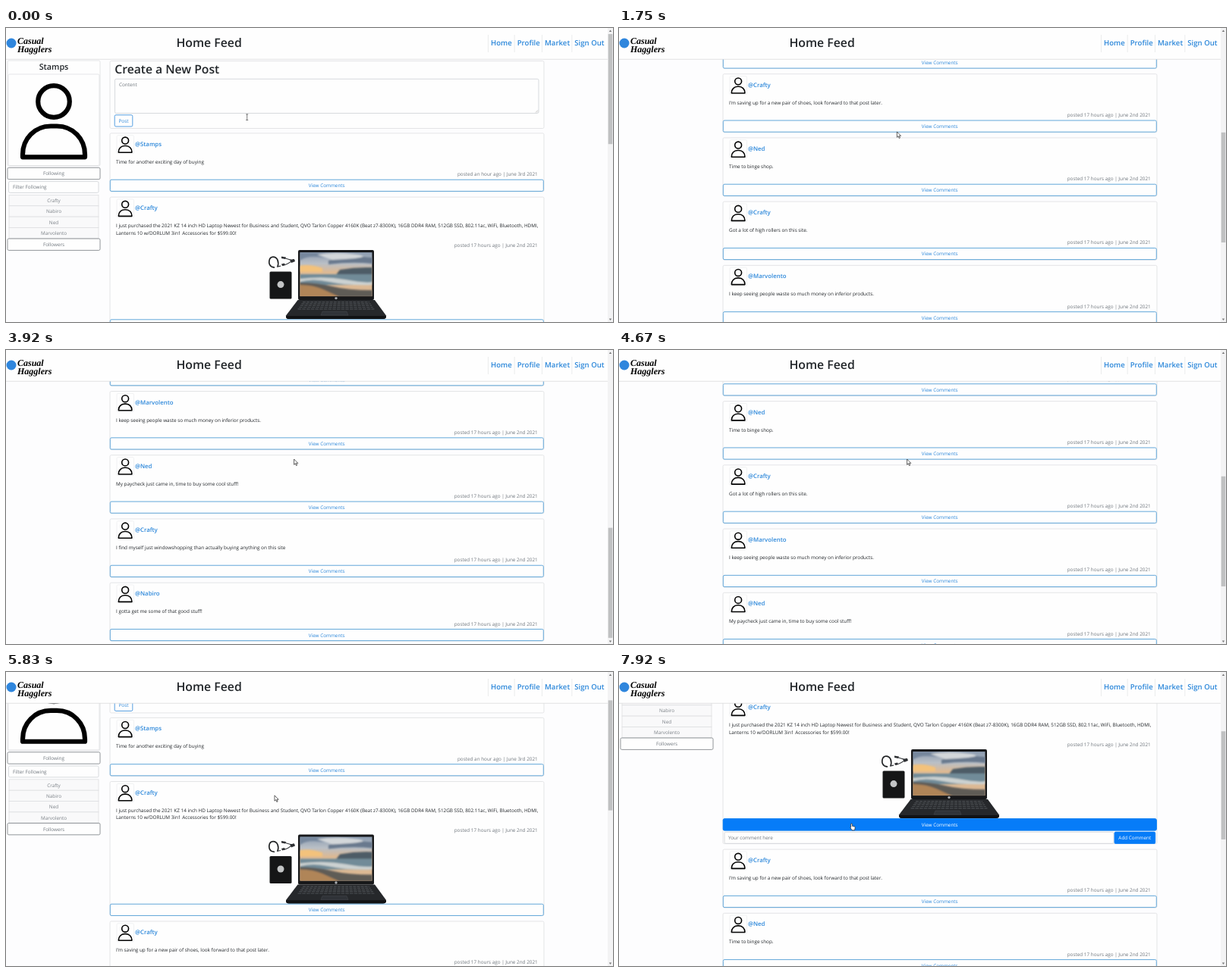
An HTML page that plays this animation: 800x388 px, repeating every 8000 ms.

```html
<!DOCTYPE html>
<html lang="en">
<head>
<meta charset="utf-8">
<title>Home Feed</title>
<style>
  html, body { margin: 0; width: 100%; height: 100%; overflow: hidden; background: #fdfdfe; }
  svg { display: block; width: 100vw; height: 100vh; }
  text { font-family: "Open Sans", "Noto Sans", sans-serif; font-size: 6.36px; text-rendering: geometricPrecision; }
  .semi { font-weight: 600; }
  .mid { text-anchor: middle; }
  .end { text-anchor: end; }
  .logo { font: italic bold 12px "Liberation Serif", "Noto Serif", serif; }
</style>
</head>
<body>
<svg id="stage" viewBox="0 0 800 388" xmlns="http://www.w3.org/2000/svg"></svg>
<script>
const LOOP = 8000, VIEW = 388, PAGE = 994, ROW = 17.5;
const BLUE = '#2b87da', SOLID = '#067cf8', INK = '#212529', GREY = '#6f767d', LINE = '#dedfe1';

const rect = (x, y, w, h, fill = 'none', stroke = 'none', extra = '') =>
  `<rect x="${x}" y="${y}" width="${w}" height="${h}" fill="${fill}" stroke="${stroke}" ${extra}/>`;
const box = (x, y, w, h, stroke = LINE, fill = '#fefefe', width = .8) =>
  rect(x, y, w, h, fill, stroke, `stroke-width="${width}" rx="1.7"`);
const text = (x, y, str, fill = INK, cls = '', size = 6.36) =>
  `<text x="${x}" y="${y}" fill="${fill}" class="${cls}" style="font-size:${size}px">${str}</text>`;
const path = (d, fill, stroke = 'none', width = 1) =>
  `<path d="${d}" fill="${fill}" stroke="${stroke}" stroke-width="${width}"/>`;
const group = (id, body, transform = '') => `<g id="${id}" transform="${transform}">${body}</g>`;

// Outlined person, drawn at the size of the sidebar portrait
const person = (width) => `<g fill="none" stroke="#000" stroke-width="${width}" stroke-linejoin="round">
  <circle cx="63" cy="97" r="20.8"/>
  <path d="M22 170.300V167C22 146 38 129.500 59 129.500H67C88 129.500 104 146 104 167V170.300Z"/></g>`;

function sidebar() {
  const names = ['Crafty', 'Nabiro', 'Ned', 'Marvolento'];
  return box(2, 43, 122, 139) + text(63, 55.2, 'Stamps', INK, 'semi mid', 10.8) +
    box(3, 61, 120, 120.5) + person(6.2) +
    box(2, 184.3, 122, 15.4, '#777c81') + text(63, 194.3, 'Following', GREY, 'mid') +
    box(3.5, 202.6, 118.5, 14.8, '#ced2d6') + text(9, 212.3, 'Filter Following', GREY) +
    names.map((name, i) => {
      const y = 220.4 + 14.35 * i;
      return rect(4, y, 118, 14.35, '#f9f9fa', LINE, 'stroke-width=".8"') +
        text(63, y + 9.7, name, '#7b8187', 'mid');
    }).join('') +
    box(2, 278, 122, 15.4, '#777c81') + text(63, 288.1, 'Followers', GREY, 'mid');
}

function composer() {
  return box(137, 43.5, 572, 89) + text(143.3, 60.2, 'Create a New Post', INK, 'semi', 15.7) +
    box(143.5, 67.3, 558.5, 45.2, '#ced2d6') + text(149, 77.4, 'Content', GREY) +
    path('M698 111.500L701 108.500M700 111.500L701 110.500', 'none', '#888', .5) +
    box(143.2, 114.8, 23.6, 15.2, BLUE) + text(155, 124.8, 'Post', BLUE, 'mid');
}

function author(name) {
  return box(146, 2.8, 22.5, 24.2, '#eeeff0') +
    `<g transform="translate(143.700 -11)scale(.213)">${person(7.5)}</g>` +
    text(170, 17, '@' + name, BLUE, 'semi', 7.8);
}

const viewButton = (y) =>
  box(137.3, y, 571, 15.2, '#62a7d9', '#fefefe', 1) +
  text(422.7, y + 10.1, 'View Comments', BLUE, 'mid');

function post([name, body, when = '17 hours ago | June 2nd']) {
  return box(137, 0, 572, 77) + author(name) + text(145, 40, body) +
    text(700.7, 56.4, `posted ${when} 2021`, GREY, 'end') + viewButton(61.3);
}

function keyboard() {
  let keys = '';
  for (let r = 0; r < 5; r++) {
    const y = 153.5 + r * 2.3, left = 391 - r * 1.6;
    keys += `<path d="M${left} ${y}H${870 - left}" stroke="#4a4d51" stroke-width="1.200" stroke-dasharray="${4 + r * .15} 1.100"/>`;
  }
  return keys;
}

// Beach at dusk: soft clouds, sea, surf and sand
function wallpaper() {
  return rect(387.5, 88, 95, 58, 'url(#dusk)') +
    `<g clip-path="url(#screen)"><g filter="url(#soft)">` +
    path('M387 88H440Q428 96 412 94T387 99Z', '#76879d') +
    path('M425 99Q445 91 483 95V103Q455 100 425 104Z', '#69798e') +
    path('M410 91Q435 87 462 91T430 98Z', '#d3d7da') +
    path('M387 106Q400 103 417 109V114H387Z', '#f3c27c') +
    path('M440 111Q462 107 483 108V119H434Z', '#4e5c66') +
    path('M387 117H483V131H387Z', '#718b98') +
    path('M387 123Q420 119 447 124T483 127V131Q448 132 426 127T387 127Z', '#ccd2d1') +
    path('M387 128Q410 128 430 133T483 138V147H387Z', '#5e5b57') +
    path('M387 131Q405 131 418 137T440 147H387Z', '#b08558') +
    '</g></g>';
}

// Product shot, in view coordinates with the lid top at y = 85
function laptop() {
  return path('M384.500 151H486L501 171.500V174Q500 176 497 176H373Q369 176 369 173V171.500Z', '#26282b') +
    path('M369 171.800H501V174Q500 176 497 176H373Q369 176 369 173Z', '#111214') +
    keyboard() + path('M417 166H449L451 171H415Z', '#303338', '#484b50', .5) +
    rect(385, 85, 100, 66, '#17181a', 'none', 'rx="2"') + wallpaper() +
    '<circle cx="435" cy="148.500" r="1.700" fill="#a9adb1"/>' +
    rect(347.5, 113.5, 29, 36, '#151617', 'none', 'rx="1.500"') +
    '<circle cx="362" cy="130.500" r="4.500" fill="#c3c5c6"/>' +
    path('M350 107C345 104 346 94 352 94S360 101 358 107M350 107L354 108', 'none', '#202224', 1.7) +
    path('M357 107L362 106M365 95Q371 97 379 99M365 105Q372 104 379 97', 'none', '#33363a', 1.1) +
    path('M363 93.500L369 94.500L368 97L363 96ZM374 98L380 97L381 100L376 102ZM363 103.500L367 102.500L368 105L364 106Z', '#2e3033');
}

function laptopPost() {
  return `<rect id="wideCard" x="137" y="0" width="572" height="177" rx="1.700" fill="#fefefe" stroke="${LINE}" stroke-width=".8"/>` +
    author('Crafty') +
    text(145, 40, 'I just purchased the 2021 KZ 14 inch HD Laptop Newest for Business and Student, QVO Tarlon Copper 4160K (Beat z7-8300K), 16GB DDR4 RAM, 512GB SSD, 802.11ac, WiFi, Bluetooth, HDMI,') +
    text(145, 49.9, 'Lanterns 10 w/DORLUM 3in1 Accessories for $599.00!') +
    text(700.7, 66.1, 'posted 17 hours ago | June 2nd 2021', GREY, 'end') +
    `<g transform="translate(0 -15)">${laptop()}</g>` + viewButton(161.7) +
    `<g id="hover">${box(137.3, 161.7, 571, 15.2, SOLID, SOLID, 1)}${text(422.7, 171.8, 'View Comments', '#fff', 'mid')}</g>` +
    `<g clip-path="url(#reveal)">` +
    box(139, 179.2, 513, 15, '#ced2d6') + text(144, 189, 'Your comment here', GREY) +
    box(653, 179, 53.8, 15.5, SOLID, SOLID) + text(679.8, 189.2, 'Add Comment', '#fff', 'mid') + '</g>';
}

function header() {
  const links = [['Home', 639], ['Profile', 673.7], ['Market', 710], ['Sign Out', 749.3]];
  return rect(0, 0, 793, 41, '#fefefe') + path('M0 41.300H793', 'none', '#dcdddf', .8) +
    '<circle cx="7" cy="20" r="6.500" fill="#2f86dd"/>' +
    '<text class="logo" x="15" y="20.500">Casual</text><text class="logo" x="15" y="32">Hagglers</text>' +
    text(224.5, 25.2, 'Home Feed', INK, 'semi', 15.8) +
    links.map(([label, x]) => text(x, 23, label, BLUE, 'semi', 9.6) +
      path(`M${x - 3.5} 9V32`, 'none', '#e6e7e9', .8)).join('');
}

const posts = [
  ['Crafty', "I'm saving up for a new pair of shoes, look forward to that post later."],
  ['Ned', 'Time to binge shop.'],
  ['Crafty', 'Got a lot of high rollers on this site.'],
  ['Marvolento', 'I keep seeing people waste so much money on inferior products.'],
  ['Ned', 'My paycheck just came in, time to buy some cool stuff!'],
  ['Crafty', 'I find myself just windowshopping than actually buying anything on this site'],
  ['Nabiro', 'I gotta get me some of that good stuff!'],
];

document.getElementById('stage').innerHTML =
  `<defs><linearGradient id="dusk" x2="0" y2="1"><stop stop-color="#8b9bb0"/><stop offset=".25" stop-color="#b9bfc6"/>
   <stop offset=".45" stop-color="#dcb994"/></linearGradient>
   <filter id="soft"><feGaussianBlur stdDeviation="1.2"/></filter>
   <clipPath id="screen"><rect x="387.500" y="88" width="95" height="58"/></clipPath>
   <clipPath id="reveal"><rect id="revealBox" x="137" y="177.500" width="572" height="0"/></clipPath></defs>` +
  rect(0, 0, 800, VIEW, '#fdfdfe') +
  group('page', sidebar() + composer() +
    group('first', post(['Stamps', 'Time for another exciting day of buying', 'an hour ago | June 3rd']), 'translate(0 138.900)') +
    group('second', laptopPost(), 'translate(0 223.100)') +
    group('rest', posts.map((p, i) => group('post' + i, post(p), `translate(0 ${407.6 + 84.2 * i})`)).join(''))) +
  header() +
  rect(793, 0, 7, VIEW, '#f3f3f4') +
  path('M794.800 5L796.500 2.500L798.200 5ZM794.800 383.500L796.500 386L798.200 383.500Z', '#777') +
  `<rect id="thumb" x="793.700" width="5.600" fill="#c0c1c2"/>` +
  group('beam', path('M-1.500 -3.800H1.500M0 -3.800V3.800M-1.500 3.800H1.500', 'none', '#444', .7)) +
  group('arrow', path('M0 0V7.300L1.700 5.800L2.900 8.600L4.100 8L2.900 5.400H5.200Z', '#fff', '#222', .7)) +
  group('hand', path('M1.500 0Q2.400 0 2.400 1V3.300L5.500 4Q6.300 4.300 6.200 5.200L5.600 8.800H2L0 5.600Q-.2 4.800 .6 4.900V1Q.6 0 1.500 0Z', '#fff', '#222', .7));

const el = Object.fromEntries(
  ['page', 'rest', 'wideCard', 'hover', 'revealBox', 'thumb', 'beam', 'arrow', 'hand']
    .map(id => [id, document.getElementById(id)]));

const clamp = v => Math.max(0, Math.min(1, v));
const ease = v => v * v * (3 - 2 * v);

// Linear track through [time, ...values]
function track(keys, t) {
  const next = keys.findIndex(k => k[0] > t);
  if (next === 0) return keys[0].slice(1);
  if (next < 0) return keys[keys.length - 1].slice(1);
  const a = keys[next - 1], b = keys[next], f = (t - a[0]) / (b[0] - a[0]);
  return a.slice(1).map((v, i) => v + (b[i + 1] - v) * f);
}

const scrollKeys = [[420, 0], [1080, 208], [2080, 415], [2180, 415], [2420, 486], [3000, 606],
  [3920, 606], [4330, 470], [4600, 470], [5170, 102], [5420, 25], [5560, 25], [6400, 191]];
const pointerKeys = [[0, 317.7, 117.7], [80, 317.7, 117.7], [250, 370, 138.8], [1330, 370, 138.8], [2080, 363.5, 135.5],
  [3420, 363.5, 135.5], [3670, 379.6, 144], [5420, 379.6, 144], [6400, 318.5, 189], [6500, 318.5, 189], [6900, 305, 200]];

function render(t) {
  const [scroll] = track(scrollKeys, t);
  const [x, y] = track(pointerKeys, t);
  const open = ROW * ease(clamp((t - 7000) / 340));
  const height = PAGE + open;

  el.page.setAttribute('transform', `translate(0 ${-scroll})`);
  el.rest.setAttribute('transform', `translate(0 ${open})`);
  el.wideCard.setAttribute('height', 177 + open);
  el.revealBox.setAttribute('height', open);
  el.hover.setAttribute('opacity', clamp((t - 6650) / 150));
  el.thumb.setAttribute('y', 8 + 372 * scroll / height);
  el.thumb.setAttribute('height', 372 * VIEW / height);

  const shape = t < 80 ? 'beam' : t < 6650 ? 'arrow' : 'hand';
  for (const id of ['beam', 'arrow', 'hand']) {
    el[id].setAttribute('visibility', id === shape ? 'visible' : 'hidden');
    el[id].setAttribute('transform', `translate(${x} ${y})`);
  }
}

const start = performance.now();
function frame() {
  render((performance.now() - start) % LOOP);
  requestAnimationFrame(frame);
}
frame();
</script>
</body>
</html>
```
